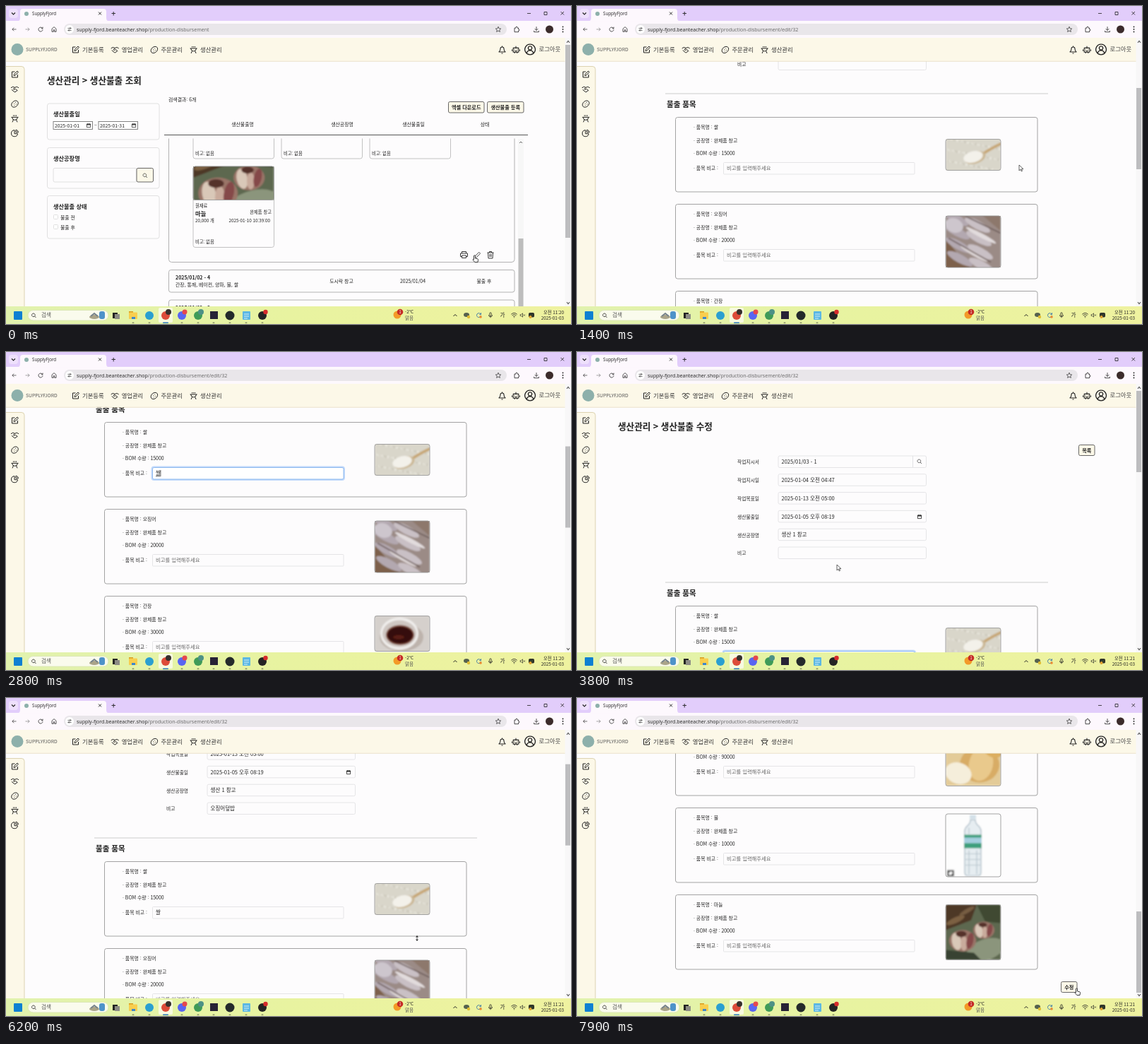
An HTML page for the animation above (8 s loop, 800 by 450 pixels).

```html
<!DOCTYPE html>
<html lang="ko">
<head>
<meta charset="utf-8">
<style>
html, body { margin: 0; width: 100%; height: 100%; overflow: hidden; background: #fdfcfd; }
svg { display: block; }
text { font-family: "Noto Sans CJK KR", "Noto Sans KR", "Noto Sans CJK", sans-serif; white-space: pre; }
.ui { font-family: "Open Sans", sans-serif; }
</style>
</head>
<body>
<script>
const INK = '#222', CREAM = '#fcf8e8';

// Drawing helpers
const attrs = o => Object.entries(o).map(([k, v]) => ` ${k}="${v}"`).join('');
const rect = (x, y, w, h, fill, o = {}) =>
  `<rect x="${x}" y="${y}" width="${w}" height="${h}" fill="${fill}"${attrs(o)}/>`;
const box = (x, y, w, h, stroke, fill = '#fdfcfd', rx = 2) =>
  rect(x, y, w, h, fill, { stroke, rx, 'stroke-width': .9 });
const disc = (x, y, r, fill) => `<circle cx="${x}" cy="${y}" r="${r}" fill="${fill}"/>`;
const oval = (x, y, rx, ry, fill, turn = 0) =>
  `<ellipse cx="${x}" cy="${y}" rx="${rx}" ry="${ry}" fill="${fill}" transform="rotate(${turn} ${x} ${y})"/>`;
const line = (d, stroke = INK, width = 1, fill = 'none') =>
  `<path d="${d}" fill="${fill}" stroke="${stroke}" stroke-width="${width}"/>`;
const shape = (d, fill) => `<path d="${d}" fill="${fill}"/>`;
const text = (x, y, s, size = 6.9, o = {}) =>
  `<text x="${x}" y="${y + size * .37}" font-size="${size}"${attrs({ fill: INK, ...o })}>${s}</text>`;
const mid = { 'text-anchor': 'middle' }, end = { 'text-anchor': 'end' }, bold = { 'font-weight': 700 };
const group = (id, body) => `<g id="${id}">${body}</g>`;

const ICONS = {
  pen: 'M12 4H4v16h16v-8M9 15l1-4L19 2l3 3-9 9z',
  shake: 'M1 8l5-3 6 2 6-2 5 3M3 13l7 6 3 1 6-5M12 7l-4 5 3 1 3-2 6 5',
  cookie: 'M4 19a10 7.5-42 1 1 16-14a10 7.5-42 1 1-16 14M9 11h1.5M13 8h1.5M10 16h1.5M15 13h1.5',
  grill: 'M2 8h20M4 8q1 8 8 8t8-8M8 15l-3 7M16 15l3 7M8 5V2M12 5V2M16 5V2',
  pie: 'M11 3a9 9 0 1 0 9 10h-9zM15 2a8 8 0 0 1 7 7h-7z',
  bell: 'M3 18h18q-4-3-4-9a5 5 0 0 0-10 0q0 6-4 9zM10 22h4M12 4V1',
  bot: 'M5 8h14v11H5zM12 8V3M2 12v4M22 12v4M8 13h2M14 13h2M9 16h6M9 19v3M15 19v3',
  user: 'M12 1a11 11 0 1 0 .1 0M12 5a4 4 0 1 0 .1 0M5 20q1-6 7-6t7 6',
  search: 'M10 3a7 7 0 1 0 .1 0M15 15l6 6',
  print: 'M6 8V3h12v5M6 17H2V8h20v9h-4M6 14h12v7H6z',
  edit: 'M3 21l1-5L18 2l4 4L8 20z',
  trash: 'M3 6h18M9 6V3h6v3M5 6l1 16h12l1-16M10 10v8M14 10v8',
  cal: 'M3 5h18v16H3zM3 7h18M3 9h18M8 5V2M16 5V2',
  back: 'M21 12H4M11 5l-7 7 7 7',
  next: 'M3 12h17M13 5l7 7-7 7',
  reload: 'M20 13a8 8 0 1 1-2-6l2 2M20 3v6h-6',
  home: 'M4 21V10l8-7 8 7v11h-6v-7h-4v7z',
  star: 'M12 2l3 7 7 .6-5.3 4.7 1.6 7-6.3-3.8-6.3 3.8 1.6-7L2 9.6 9 9z',
  puzzle: 'M4 7h5V5a3 3 0 0 1 6 0v2h4v5h1a2 2 0 0 1 0 5h-1v5H4z',
  down: 'M12 2v14M6 10l6 6 6-6M3 17v5h18v-5',
  tune: 'M3 7h10M17 7h4M3 17h4M11 17h10M15 4a3 3 0 1 0 .1 0M9 14a3 3 0 1 0 .1 0',
  mic: 'M9 5a3 3 0 0 1 6 0v7a3 3 0 0 1-6 0zM5 11q0 7 7 7t7-7M12 18v4',
  wifi: 'M2 9q10-9 20 0M5 13q7-7 14 0M9 17q3-3 6 0M11 20h2',
  speaker: 'M2 9h4l6-5v16l-6-5H2zM16 9l6 6M22 9l-6 6'
};
const icon = (name, x, y, size, width = 2, color = INK) =>
  `<path d="${ICONS[name]}" transform="translate(${x - size / 2} ${y - size / 2}) scale(${size / 24})"
    fill="none" stroke="${color}" stroke-width="${width}" stroke-linejoin="round"/>`;

// Pictures, simplified to soft shapes inside a 78-wide view centred on y = 39
const bulb = (x, y, r) => oval(x, y, r, r * .8, '#9a7468') + oval(x - r * .45, y + 1, r * .35, r * .65, '#d9c8b8', -12) +
  oval(x + r * .1, y + r * .2, r * .25, r * .55, '#c9ab9c') + oval(x + r * .55, y, r * .25, r * .6, '#85484a', 12) +
  oval(x - r * .1, y - r * .5, r * .4, r * .22, '#54312c');
const PICTURES = {
  rice: rect(0, 0, 78, 78, '#d9d6ca') +
    Array.from({ length: 110 }, (_, i) => oval(i * 37 % 79, 16 + i * 23 % 47, 2, .9, i % 3 ? '#e8e6dc' : '#c5c1b3', i * 50)).join('') +
    line('M51 39Q62 31 79 23', '#c7a777', 4) + oval(42, 43, 15, 8.5, '#cbb795', -18) + oval(39, 42, 14, 8, '#f3f1ea', -15),
  squid: rect(0, 0, 78, 78, '#9b8b86') + shape('M0 36l36 42H0z', '#7d614b') + shape('M50 0h28v24z', '#8d786c') +
    Array.from({ length: 8 }, (_, i) => oval(14 + i * 31 % 60, 6 + i * 9.5, 20, 6, i % 2 ? '#c9c0c5' : '#b3a8b0', 28)).join('') +
    oval(12, 16, 13, 10, '#cdc6cd', 20) + oval(50, 30, 24, 3, '#e2dcdd', 28) + oval(40, 56, 22, 3, '#ddd5d6', 30) +
    line('M28 3l50 24M4 34l60 34', '#6b5a58', 1.5),
  soy: rect(0, 0, 78, 78, '#d5d0cc') + oval(38, 44, 31, 20, '#bdb3ac') + oval(35, 39, 27, 23, '#f0eeec') +
    oval(35, 39, 24, 19, '#cfc7c2') + oval(36, 41, 20, 14, '#7a4436') + oval(36, 41, 18, 12, '#35110d') + oval(34, 44, 8, 3, '#5a1c12'),
  paste: rect(0, 0, 78, 78, '#eee8e2') + oval(39, 42, 31, 22, '#cfc4bb') + oval(39, 39, 26, 17, '#a62a1c'),
  onion: rect(0, 0, 78, 78, '#e3cb98') + oval(48, 48, 28, 25, '#d8ac65') + oval(50, 47, 17, 24, '#e9c98c', 12) +
    oval(18, 60, 19, 15, '#f5eedb', 20) + oval(70, 18, 18, 20, '#dcae5e'),
  water: rect(0, -9, 78, 96, '#fdfdfd') + rect(34, -4, 9, 6, '#d3e0e8') +
    line('M35 3h7q0 5 5 9q4 4 3 10v55q0 5-4 5h-15q-4 0-4-5v-55q-1-6 3-10q5-4 5-9z', '#a5b7c2', 1.2, '#e6edf1') +
    line('M28 51h21M28 59h21M28 67h21M33 14v9M33 46v34M44 46v34', '#b5c3cb', 1.2) +
    rect(26, 24, 25, 19, '#3d9f7c') + rect(26, 28, 25, 8, '#a5cfdf') + rect(2, 74, 10, 9, '#555', { rx: 1 }) +
    oval(7, 78.5, 3, 2, '#fff', -35),
  garlic: rect(0, 0, 78, 78, '#5d6850') + shape('M0 0h44l-8 22-36 14z', '#4d3826') + oval(14, 22, 14, 4, '#7b6042', -25) +
    oval(30, 9, 12, 3, '#765d42', -30) + shape('M44 0h34v26l-22-2z', '#3f4a31') + oval(56, 64, 28, 15, '#8b957c', -20) +
    shape('M0 64l40 4 10 10H0z', '#394331') + bulb(54, 36, 15) + bulb(24, 51, 19)
};
const picture = (name, x, y, w, h, view = `0 ${39 - h / 2} 78 ${h}`) =>
  `<svg x="${x}" y="${y}" width="${w}" height="${h}" viewBox="${view}" preserveAspectRatio="xMidYMid slice"><g filter="url(#soft)">${PICTURES[name]}</g></svg>` +
  rect(x, y, w, h, 'none', { stroke: '#999', rx: 3, 'stroke-width': .9 });

const button = (x, y, w, h, s) => box(x, y, w, h, '#555', CREAM) + text(x + w / 2, y + h / 2, s, 7.2, { ...mid, ...bold });

// Production list
function listPage() {
  const tile = (x, y) => box(x, y, 114.5, 114.5, '#bbb', '#fdfcfd', 3) + text(x + 3, y + 107, '비고: 없음', 6.3);
  const row = (y, title, items) => box(230.5, y, 489.5, 31.5, '#aaa', '#fdfcfd', 3) +
    text(240, y + 11, title, 7, bold) + text(240, y + 21, items) + text(475, y + 16, '도시락 창고', 6.9, mid) +
    text(576, y + 16, '2025/01/04', 6.9, mid) + text(677, y + 16, '불출 후', 6.9, mid);
  const date = (x, s) => box(x, 163.5, 55.5, 11, '#777', '#fff', 0) + text(x + 2, 169, s, 6.8) + icon('cal', x + 50, 169, 7, 2.5);
  const panel = (y, h, s) => box(58.5, y, 158.5, h, '#ddd', '#fdfcfd', 3) + text(67, y + 15, s, 8.2, bold);
  const check = (y, s) => box(67.5, y - 3.5, 6, 6, '#ddd', '#fff', 1) + text(77, y, s);
  const heads = { 생산불출명: 335, 생산공장명: 476, 생산불출일: 577, 상태: 678 };
  const scrolled = box(230.5, 150, 489.5, 212.5, '#aaa', '#fdfcfd', 4) + [265, 390, 515].map(x => tile(x, 101.5)).join('') +
    tile(265, 227) + picture('garlic', 265, 227, 114.5, 47.5, '0 25 78 32.4') + text(268, 282.5, '원재료', 6.3) +
    text(268, 293.5, '마늘', 8.3, bold) + text(376, 291.5, '완제품 창고', 6.3, end) + text(268, 304, '20,000 개', 6.3) +
    text(374, 304, '2025-01-10 10:39:00', 6.3, end) +
    icon('print', 648.5, 352, 12, 1.8) + icon('edit', 667, 353, 11, 1.8) + icon('trash', 686, 352, 12, 1.8) +
    row(373.5, '2025/01/02 - 4', '간장, 통깨, 베이컨, 양파, 물, 쌀') + row(416, '2025/01/02 - 3', '간장, 통깨, 양파, 물, 쌀');
  return text(58, 105.5, '생산관리 &gt; 생산불출 조회', 12.6, bold) + text(230, 132.5, '검색결과: 6개') +
    panel(138, 51, '생산불출일') + date(67, '2025-01-01') + text(125, 169, '~', 6.5) + date(131, '2025-01-31') +
    panel(200.5, 57.5, '생산공장명') + box(67, 229.5, 118, 19.5, '#ddd') + box(185, 229.5, 23.5, 19.5, '#555', CREAM) +
    icon('search', 197, 240, 8) + panel(268.5, 60.5, '생산불출 상태') + check(299, '불출 전') + check(313, '불출 후') +
    button(626.5, 135.5, 50.5, 15.5, '엑셀 다운로드') + button(681.5, 135.5, 51.5, 15.5, '생산불출 등록') +
    Object.entries(heads).map(([s, x]) => text(x, 167, s, 6.9, mid)).join('') +
    line('M224 182.5H739', '#555') + `<g clip-path="url(#listClip)">${scrolled}</g>` +
    rect(725, 188, 8, 240, '#f7f7f7') + rect(725.5, 329, 7, 100, '#bdbdbd') + line('M727 194l2-2 2 2', '#666');
}

// Edit form, laid out as one tall document
const GOODS = [
  ['쌀', 15000, 'rice', 44], ['오징어', 20000, 'squid', 73], ['간장', 30000, 'soy', 50], ['고추장', 60000, 'paste', 50],
  ['양파', 90000, 'onion', 78], ['물', 10000, 'water', 89], ['마늘', 20000, 'garlic', 78]
];
const FIELDS = [
  ['작업지시서', '2025/01/03 - 1'], ['작업지시일', '2025-01-04 오전 04:47'], ['작업목표일', '2025-01-13 오전 05:00'],
  ['생산불출일', '2025-01-05 오후 08:19'], ['생산공장명', '생산 1 창고'], ['비고', '']
];
function editPage() {
  const field = ([label, value], i) => {
    const y = 155.5 + i * 25.8;
    return text(227, y + .5, label, 6.75) + box(285, y - 8.5, 209.5, 16.5, '#e2e2e5') + text(289.5, y, value, 7.5);
  };
  const card = ([name, amount, pic, h], i) => {
    const y = Math.floor(359.6 + i * 122.75) + .5;
    return box(139.5, y, 512.5, 105.5, '#999', '#fdfcfd', 3) + text(165, y + 14, `· 품목명 : ${name}`) +
      text(165, y + 32.5, '· 공장명 : 완제품 창고') + text(165, y + 51.2, `· BOM 수량 : ${amount}`) +
      text(165, y + 72, '· 품목 비고 :') + box(207.5, y + 64, 270.5, 16.5, '#e2e2e5', '#fdfcfd', 1) +
      (i ? text(212, y + 72, '비고를 입력해주세요', 7.3, { fill: '#666' }) : '') +
      picture(pic, 522, y + 53 - h / 2, 78, h);
  };
  return text(58, 105.5, '생산관리 &gt; 생산불출 수정', 12.6, bold) + button(710.5, 131.5, 22.5, 15, '목록') +
    FIELDS.map(field).join('') + line('M475.5 147v16.500', '#e2e2e5') + icon('search', 485, 155, 8) + icon('cal', 485, 233, 7, 2.8) +
    line('M125 326H667', '#ccc') + text(127, 341.5, '불출 품목', 10.5, bold) + GOODS.map(card).join('') +
    button(685.5, 1219.5, 22.5, 15, '수정') + group('notes', '');
}

function siteFrame() {
  const menu = [['pen', '기본등록'], ['shake', '영업관리'], ['cookie', '주문관리'], ['grill', '생산관리']];
  return box(-4, 85.5, 30, 350, '#d9cfaa', CREAM, 4) +
    ['pen', 'shake', 'cookie', 'grill', 'pie'].map((n, i) => icon(n, 12.5, 97 + i * 20.8, 12, 2)).join('') +
    rect(0, 45, 792, 33, CREAM) + line('M0 78.3H792', '#e6dec2', .8) + disc(16, 61.5, 8.5, '#8db0ab') +
    text(28, 61, 'SUPPLYFJORD', 6.8, { fill: '#555' }) +
    menu.map(([n, s], i) => icon(n, 98.5 + i * 55.7, 62, 12, 2) + text(108 + i * 55.7, 62, s, 8.3, { fill: '#333' })).join('') +
    icon('bell', 702.5, 62, 12, 2.2) + icon('bot', 722, 61.5, 13, 2) + icon('user', 742, 61.5, 16, 2) +
    text(754.5, 60.5, '로그아웃', 8.3, { fill: '#444' }) +
    rect(791.5, 45, 9, 381, '#f8f7f8') + line('M794 52l2-2.500 2 2.500M794 419l2 2.500 2-2.500', '#555', 1.2) +
    rect(792, 56, 7, 115, '#bdbdbf', { id: 'thumb' });
}

function browser() {
  return rect(0, 0, 800, 21.5, '#e2cdfb') + rect(0, 21, 800, 24, '#fdf8fd') +
    shape('M16 21.5q4 0 4-5V8q0-4 4-4H138q4 0 4 4v8.500q0 5 4 5z', '#fdf8fd') +
    rect(4, 4, 13, 13, '#eee0fc', { rx: 4 }) + line('M8 9.5l2.500 2.500 2.500-2.500', INK, 1.1) + disc(29, 11, 3, '#8db0ab') +
    text(37, 11, 'SupplyFjord', 6.2, { class: 'ui' }) + line('M131 8.5l4 4m0-4l-4 4M149.500 10.500h5.500M152.200 8v5.500', INK, .9) +
    line('M738 10.5h5M762 8.500h4v4h-4zM785.500 8l4.500 4.500m0-4.500l-4.500 4.500', INK, .8) +
    icon('back', 11.5, 33, 8) + icon('next', 30.5, 33, 8, 2, '#777') + icon('reload', 49, 33, 9) + icon('home', 68, 33, 9) +
    rect(82, 25, 627, 16, '#e9e6ea', { rx: 8 }) + disc(90, 33, 6, '#fff') + icon('tune', 90, 33, 7) +
    text(100, 33, '<tspan fill="#222">supply-fjord.beanteacher.shop</tspan><tspan id="path"></tspan>', 7.05, { class: 'ui', fill: '#666' }) +
    icon('star', 697, 33, 9, 1.8) + icon('puzzle', 723, 33, 9, 2.2) + icon('down', 751, 33, 9, 2.2) + disc(769.5, 33, 5.5, '#3b2b2b') +
    [29.5, 33, 36.5].map(y => disc(788.5, y, .9, INK)).join('');
}

function taskbar() {
  const apps = [180, 203, 226, 249, 272, 294, 317, 340, 363], active = 226;
  const mark = x => rect(x - (x === active ? 4 : 1.5), 447.5, x === active ? 8 : 3, 1.5, x === active ? '#2877b8' : '#899067', { rx: .7 });
  return rect(0, 425, 800, 25, 'url(#bar)') + rect(11, 432, 12, 12, '#0d80d2', { rx: 1 }) +
    box(31, 430.5, 114, 14.5, '#dbe6b5', '#fafbed', 7.5) + icon('search', 39.5, 438, 8, 2.4) + text(50, 437.5, '검색', 7.6, { fill: '#555' }) +
    oval(125, 440, 7, 3, '#aaa489') + line('M120 439l5-4 5 4', '#75818a', 2) + rect(132, 432, 8, 11, '#4e92c9', { rx: 3 }) +
    rect(216, 427, 20, 21, '#f7fae0', { rx: 2 }) +
    rect(151, 434, 7, 8, '#222') + rect(154, 436, 7, 7, '#8c8c84') +
    rect(174, 432, 6, 4, '#d99d20') + rect(174, 433.5, 12, 9.5, '#f8ce4e', { rx: 1 }) + rect(178, 440, 5, 3, '#3d86cc') +
    disc(203, 438, 6, '#2a9fd0') + disc(226, 438, 6, '#dd4b39') + disc(230, 433, 4, '#37302d') +
    disc(249, 438, 6, '#5865f2') + disc(253, 433, 3.5, '#e5484d') + disc(272, 438, 6, '#3f9b58') + disc(276, 433, 4, '#4d9186') +
    rect(289, 432, 11, 11, '#272235') + disc(317, 438, 6.5, '#242a2b') +
    rect(335, 432, 11, 12, '#5bb7e3', { rx: 1 }) + line('M337 436h7M337 439h7M337 442h5', '#f0fbff', .8) +
    disc(363, 438, 6, '#242424') + disc(367.5, 433, 3.2, '#d62b2b') + apps.map(mark).join('') +
    disc(554, 437, 5.5, '#f39a28') + disc(558, 433, 4.3, '#c52b25') + text(558, 433, '1', 5.5, { ...mid, fill: '#fff' }) +
    text(565, 433, '-2°C', 6.3) + text(565, 441.5, '맑음', 6.5, { fill: '#555' }) +
    line('M633.5 439l2.500-2.500 2.500 2.500') + oval(652, 437, 4, 3, '#55614e') + disc(655, 440, 2.2, '#e1bd31') +
    icon('reload', 669.5, 437.5, 9, 2.6, '#427da5') + disc(672, 440, 1.8, '#ed8b31') +
    icon('mic', 686, 437.5, 9) + text(699.5, 437.5, '가', 7.6) + icon('wifi', 719.5, 437.5, 10) + icon('speaker', 731.5, 437.5, 8) +
    box(740.5, 434.5, 7, 5.5, INK, '#303a2b', 1) + disc(742.5, 440, 2, '#e2a22c') +
    group('clock', '') + text(790, 441.5, '2025-01-03', 6.3, end);
}

const POINTERS = {
  arrow: line('M0 0v8l2-1.800 1.300 2.800 1.200-.6L3.300 5.700H6z', INK, .7, '#fff'),
  hand: line('M-.5 1q0-1.300 1-1.300t1 1.300v3l3 .7q1.200.3 1 1.600L5 9.500H.8L-2 6.200q0-1.200 1.500-.5z', INK, .9, '#fff'),
  beam: line('M-1.500-4h3M0-4v8M-1.500 4h3', INK, .7),
  pan: shape('M0-4l2 2.500h-4zM0 4l2-2.500h-4z', INK) + disc(0, 0, .7, INK),
  none: ''
};

document.body.innerHTML = `<svg width="800" height="450" viewBox="0 0 800 450">
  <defs><clipPath id="listClip"><rect x="224" y="187.5" width="510" height="240"/></clipPath>
  <filter id="soft"><feGaussianBlur stdDeviation=".8"/></filter>
  <linearGradient id="bar"><stop stop-color="#e1f2ae"/><stop offset=".5" stop-color="#e8f3a0"/><stop offset="1" stop-color="#eff2a0"/></linearGradient></defs>
  ${rect(0, 0, 800, 450, '#fdfcfd')}${group('list', listPage())}${group('edit', editPage())}
  ${siteFrame()}${browser()}${taskbar()}${group('pointer', '')}</svg>`;

// Timeline: each key is [time, ...values]; steps hold, tracks blend
const SCROLL = [[0, 0], [700, 0], [1200, 202], [1500, 202], [1700, 260], [3000, 260], [3500, 0], [4400, 0], [4500, 12],
  [5700, 12], [6200, 128], [7300, 818], [8000, 818]];
const MOUSE = [[0, 663, 353], [600, 663, 353], [1100, 626, 225], [1500, 626, 225], [2000, 300, 172], [3000, 300, 172],
  [3700, 368, 301], [3900, 368, 301], [4200, 368, 284], [5400, 368, 284], [5600, 582, 340], [7300, 582, 340],
  [7700, 707, 411], [8000, 707, 411]];
const POINTER = [[0, 'hand'], [600, 'arrow'], [1900, 'beam'], [2500, 'none'], [3000, 'arrow'], [4100, 'beam'], [4500, 'none'],
  [5400, 'arrow'], [5700, 'pan'], [7300, 'arrow'], [7700, 'hand']];
const RICE_NOTE = [[0, ''], [2500, 'ㅆ'], [2600, '싸'], [2700, '쌀']];
const FORM_NOTE = [[0, ''], [4500, '오'], [4600, '오지'], [4700, '오징'], [4800, '오징어'], [5000, '오징어더'], [5100, '오징어덮'],
  [5200, '오징어덮바'], [5300, '오징어덮밥']];

const step = (keys, t) => keys.filter(k => k[0] <= t).pop()[1];
function track(keys, t) {
  const i = keys.findIndex(k => k[0] > t), a = keys[i - 1], b = keys[i];
  const p = (t - a[0]) / (b[0] - a[0]);
  return a.slice(1).map((v, n) => v + (b[n + 1] - v) * p);
}

function note(x, y, w, value, focused, hint = '') {
  const left = x + 4.5, caret = left + value.length * 6.9;
  return (focused ? rect(x - 1, y - 9, w + 2, 18.5, '#fff', { stroke: '#c3dafb', 'stroke-width': 2, rx: 3 }) +
      box(x, y - 8, w, 16.5, '#83b1ed', '#fff') + line(`M${caret} ${y - 4.5}v9`, INK, .7) : '') +
    (focused && value ? line(`M${caret - 6.9} ${y + 4.3}h6.5`, INK, .7) : '') +
    text(left, y, value || hint, value ? 7.5 : 7.3, { fill: value ? INK : '#666' });
}

const el = id => document.getElementById(id);
function draw() {
  const t = Math.floor(performance.now() % 8000 / 100) * 100;
  const editing = t >= 500, scroll = Math.round(track(SCROLL, t)[0]), [x, y] = track(MOUSE, t);
  el('list').style.display = editing ? 'none' : '';
  el('edit').style.display = editing ? '' : 'none';
  el('edit').setAttribute('transform', `translate(0 ${-scroll})`);
  el('notes').innerHTML =
    note(207.5, 431.5, 270.5, step(RICE_NOTE, t), t >= 2200 && t < 4300, '비고를 입력해주세요') +
    note(285, 284.3, 209.5, step(FORM_NOTE, t), t >= 4300 && t < 5600);
  el('thumb').setAttribute('y', 55 + scroll * .302);
  el('thumb').setAttribute('height', editing ? 115 : 273);
  el('path').textContent = '/production-disbursement' + (editing ? '/edit/32' : '');
  el('clock').innerHTML = text(790, 433.5, t < 3300 ? '오전 11:20' : '오전 11:21', 6.3, end);
  el('pointer').innerHTML = POINTERS[step(POINTER, t)];
  el('pointer').setAttribute('transform', `translate(${x} ${y})`);
  requestAnimationFrame(draw);
}
draw();
</script>
</body>
</html>
```
